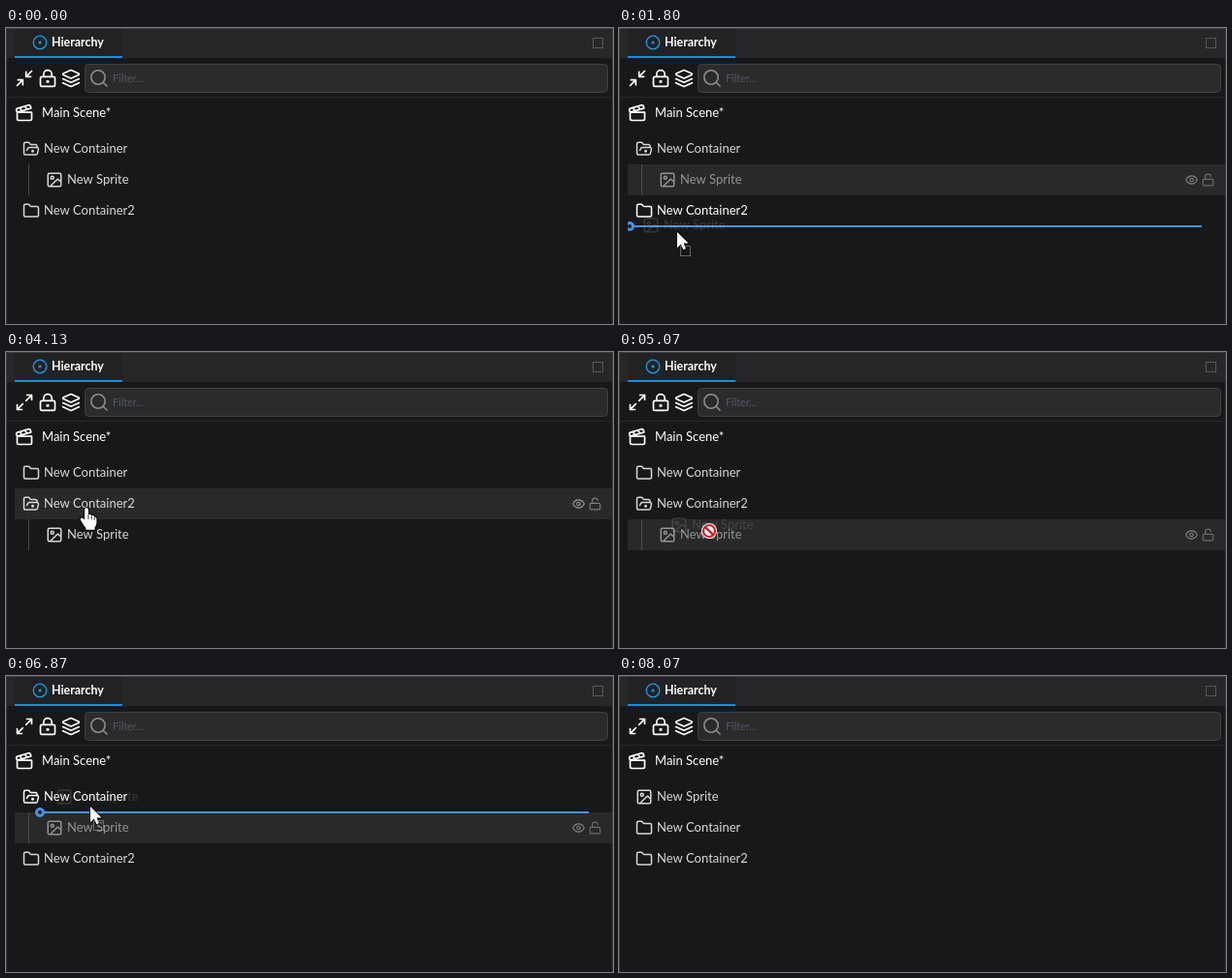
Recreate the animation shown at these times as an HTML page with a canvas. Size 626 by 306 pixels, loop 8670 ms.

```html
<!DOCTYPE html>
<html lang="en">
<head>
<meta charset="utf-8">
<title>Hierarchy panel</title>
<style>
  html, body { margin: 0; width: 100%; height: 100%; overflow: hidden; background: #18181a; }
  canvas { display: block; width: 626px; height: 306px; }
</style>
</head>
<body>
<canvas id="stage"></canvas>
<script>
const W = 626, H = 306, LOOP = 8670, TICK = 1000 / 15;
const LEFT = 9, RIGHT = 625, TOP = 109, ROW = 32, INDENT = 24;
const TEXT = '#d8d8d8', BLUE = '#4b91e2';

const canvas = document.getElementById('stage');
const ctx = canvas.getContext('2d');
const dpr = window.devicePixelRatio || 1;
canvas.width = W * dpr;
canvas.height = H * dpr;

// Icons live on a 24-unit grid.
const box = (x, y, w, h, r) =>
  `M${x + r} ${y}h${w - 2 * r}a${r} ${r} 0 0 1 ${r} ${r}v${h - 2 * r}a${r} ${r} 0 0 1 ${-r} ${r}h${2 * r - w}a${r} ${r} 0 0 1 ${-r} ${-r}v${2 * r - h}a${r} ${r} 0 0 1 ${r} ${-r}z`;
const ring = (x, y, r) => `M${x - r} ${y}a${r} ${r} 0 1 0 ${2 * r} 0a${r} ${r} 0 1 0 ${-2 * r} 0z`;
const layer = y => `M22 ${y}l-9.2 4.2a2 2 0 0 1-1.6 0L2 ${y}`;

const icons = {
  shrink: 'M4 14h6v6M20 10h-6V4M14 10l7-7M3 21l7-7',
  grow: 'M15 3h6v6M9 21H3v-6M21 3l-7 7M3 21l7-7',
  lock: box(3, 10, 18, 12, 2) + 'M7 10V7a5 5 0 0 1 10 0v3' + ring(12, 16, 1),
  unlock: box(3, 11, 18, 11, 2) + 'M7 11V7a5 5 0 0 1 9.9-1',
  layers: 'M12.8 2.2a2 2 0 0 0-1.6 0L2.6 6.1a1 1 0 0 0 0 1.8l8.6 3.9a2 2 0 0 0 1.6 0l8.6-3.9a1 1 0 0 0 0-1.8z' + layer(12.6) + layer(17.6),
  clapper: 'M20.2 6L3 11l-.9-2.4c-.3-1.1.3-2.2 1.3-2.5l13.5-4c1.1-.3 2.2.3 2.5 1.3zM6.2 5.3l3.1 3.9M12.4 3.4l3.1 4M3 11h18v8a2 2 0 0 1-2 2H5a2 2 0 0 1-2-2z',
  folder: 'M20 20a2 2 0 0 0 2-2V8a2 2 0 0 0-2-2h-7.9a2 2 0 0 1-1.7-.9L9.6 3.9A2 2 0 0 0 7.9 3H4a2 2 0 0 0-2 2v13a2 2 0 0 0 2 2z',
  open: 'M6 14l1.5-2.9A2 2 0 0 1 9.2 10H20a2 2 0 0 1 1.9 2.5l-1.5 6a2 2 0 0 1-2 1.5H4a2 2 0 0 1-2-2V5a2 2 0 0 1 2-2h3.9a2 2 0 0 1 1.7.9l.8 1.2a2 2 0 0 0 1.7.9H18a2 2 0 0 1 2 2v2' + ring(14, 15, 1),
  image: box(3, 3, 18, 18, 2) + ring(9, 9, 2) + 'M21 15l-3.1-3.1a2 2 0 0 0-2.8 0L6 21',
  eye: 'M2 12Q5.5 5 12 5T22 12Q18.500 19 12 19T2 12z' + ring(12, 12, 3)
};
for (const name in icons) icons[name] = new Path2D(icons[name]);

const arrow = new Path2D('M0 0V16.200L3.800 12.600L6.400 18.200L9 17L6.500 11.600H11.600z');
const hand = new Path2D('M-1.900 10V1.200Q-1.900 -1 0 -1T1.900 1.200V6.200Q4.800 5.400 5.200 7.200Q7.600 6.600 8.200 8.400Q10.400 8.200 10.400 10.600V14.500Q10.400 17.500 8.600 19.200V21.800H-.6V19.800Q-2.600 18 -4.200 15L-6.200 11.600Q-6.800 9.800 -5.200 9.400Q-3.800 9.200 -1.900 11.600z');
const fingers = new Path2D('M1.900 6.500V11M5.200 7.400V11.200M8.200 8.600V11.600');

const C1 = 'New Container', C2 = 'New Container2', SPRITE = 'New Sprite';
const row = (name, icon, level = 0) => ({ name, icon, level });
const scenes = [
  { end: 31, rows: [row(C1, 'open'), row(SPRITE, 'image', 1), row(C2, 'folder')] },
  { end: 58, rows: [row(C1, 'folder'), row(C2, 'folder'), row(SPRITE, 'image')] },
  { end: 91, rows: [row(C1, 'folder'), row(C2, 'open'), row(SPRITE, 'image', 1)] },
  { end: 112, rows: [row(C1, 'open'), row(SPRITE, 'image', 1), row(C2, 'folder')] },
  { end: 130, rows: [row(SPRITE, 'image'), row(C1, 'folder'), row(C2, 'folder')] }
];

// Drags as ticks, with the offset from pointer to the ghost's icon.
const drags = [
  { from: 16, to: 31, dx: -27, dy: -7 },
  { from: 43, to: 58, dx: -25, dy: -7 },
  { from: 76, to: 91, dx: -31, dy: -6 },
  { from: 100, to: 112, dx: -27, dy: -10 }
];

// Pointer path: tick, x, y.
const path = [
  [1, 606, 296], [5, 400, 200], [9, 140, 128], [11, 70, 155], [13, 77, 164],
  [15, 77, 164], [16, 77, 160], [18, 74, 146], [27, 60, 211], [34, 60, 211],
  [41, 51, 196], [42, 51, 196], [43, 56, 190], [46, 78, 173], [52, 84, 153],
  [58, 84, 153], [71, 81, 195], [75, 81, 195], [76, 93, 185], [86, 86, 130],
  [93, 86, 130], [98, 77, 167], [99, 77, 167], [100, 78, 160], [103, 87, 135],
  [107, 88, 111], [112, 88, 111], [121, 110, 312]
];

const same = (a, b) => a[1] === b[1] && a[2] === b[2];

function slope(i, axis) {
  const a = path[Math.max(i - 1, 0)], p = path[i], b = path[Math.min(i + 1, path.length - 1)];
  if ((a !== p && same(a, p)) || (b !== p && same(b, p))) return 0;
  const before = p[axis] - a[axis], after = b[axis] - p[axis];
  if (a !== p && b !== p && before * after <= 0) return 0;
  return (b[axis] - a[axis]) / (b[0] - a[0]);
}

function pointerAt(k) {
  if (k < path[0][0] || k >= path[path.length - 1][0]) return null;
  const i = path.findIndex((p, n) => n + 1 < path.length && k < path[n + 1][0]);
  const a = path[i], b = path[i + 1], span = b[0] - a[0];
  const u = (k - a[0]) / span, v = 1 - u;
  const ease = axis =>
    v * v * (1 + 2 * u) * a[axis] + u * u * (3 - 2 * u) * b[axis] +
    span * u * v * (v * slope(i, axis) - u * slope(i + 1, axis));
  return { x: Math.round(ease(1)), y: Math.round(ease(2)) };
}

function icon(name, cx, cy, size, color) {
  ctx.save();
  ctx.translate(cx - size / 2, cy - size / 2);
  ctx.scale(size / 24, size / 24);
  ctx.strokeStyle = color;
  ctx.lineWidth = 2;
  ctx.lineCap = ctx.lineJoin = 'round';
  ctx.stroke(icons[name]);
  ctx.restore();
}

function label(str, x, y, color, size = 13, weight = 400) {
  ctx.font = `${weight} ${size}px Lato, sans-serif`;
  ctx.fillStyle = color;
  ctx.fillText(str, x, y);
}

function rect(x, y, w, h, color) {
  ctx.fillStyle = color;
  ctx.fillRect(x, y, w, h);
}

function circle(x, y, r, color, width) {
  ctx.beginPath();
  ctx.arc(x, y, r, 0, Math.PI * 2);
  ctx.lineWidth = width || 1;
  ctx.strokeStyle = ctx.fillStyle = color;
  width ? ctx.stroke() : ctx.fill();
}

function line(x1, y1, x2, y2, color, width) {
  ctx.beginPath();
  ctx.moveTo(x1, y1);
  ctx.lineTo(x2, y2);
  ctx.strokeStyle = color;
  ctx.lineWidth = width;
  ctx.stroke();
}

function drawPanel(k) {
  rect(0, 0, W, H, '#18181a');
  rect(0, 0, W, 31, '#27272a');
  rect(LEFT, 1, 111, 30, '#222224');
  rect(0, 0, W, 1, '#3c3c3e');
  rect(0, 0, 1, H, '#3c3c3e');
  rect(W - 1, 0, 1, H, '#38383a');
  rect(LEFT, 29, 111, 2, '#158fe6');
  circle(35, 15, 6.8, '#1c9be8', 1.3);
  circle(35, 15, 1.5, '#1c9be8');
  label('Hierarchy', 47, 19, '#fff', 12.4, 700);
  ctx.strokeStyle = '#5a5a5c';
  ctx.lineWidth = 1;
  ctx.strokeRect(605.5, 10.5, 10, 10);

  icon(k < 58 ? 'shrink' : 'grow', 19, 52, 20, '#fff');
  icon('lock', 43, 52, 20, '#fff');
  icon('layers', 67, 52, 20, '#fff');

  ctx.beginPath();
  ctx.roundRect(81.5, 37.5, 539, 29, 4);
  ctx.fillStyle = '#2b2b2b';
  ctx.fill();
  ctx.strokeStyle = '#424242';
  ctx.stroke();
  circle(95, 51, 7.2, '#8e8e8e', 1.6);
  line(100.2, 56.2, 104.5, 60.5, '#8e8e8e', 1.6);
  label('Filter...', 110, 56, '#505667', 10.8);

  rect(1, 71, W - 2, 1, '#29292b');
  icon('clapper', 19, 88, 20, '#fff');
  label('Main Scene*', 37, 92, '#fff');
}

function drawRow(item, i, active, dragged, bright) {
  const y = TOP + i * ROW, cy = y + ROW / 2, x = 26 + item.level * INDENT;
  if (active) rect(LEFT, y, RIGHT - LEFT, ROW, '#29292b');
  if (item.level) rect(23, y, 1, ROW, '#4c4c4e');
  const color = bright ? '#fff' : TEXT;
  ctx.globalAlpha = dragged ? 0.6 : 1;
  icon(item.icon, x, cy, 18, color);
  label(item.name, x + 13, cy + 4, color);
  if (active) {
    icon('eye', 590.5, cy, 14, dragged ? '#b8b8ba' : '#98989a');
    icon('unlock', 607.5, cy, 14, dragged ? '#98989a' : '#7c7c7e');
  }
  ctx.globalAlpha = 1;
}

function drawDropLine(slot, level) {
  const x = LEFT + level * INDENT + 2, y = TOP + slot * ROW;
  ctx.save();
  ctx.beginPath();
  ctx.rect(LEFT, 72, RIGHT - LEFT, H);
  ctx.clip();
  circle(x, y, 3.5, BLUE, 3);
  rect(x + 4, y - 1, 601 - x - 4, 2, BLUE);
  ctx.restore();
}

function drawGhost(x, y) {
  ctx.globalAlpha = 0.17;
  icon('image', x, y, 18, TEXT);
  label(SPRITE, x + 13, y + 4, TEXT);
  ctx.globalAlpha = 1;
}

function drawPointer(p, kind) {
  ctx.save();
  ctx.translate(p.x, p.y);
  if (kind === 'deny') {
    circle(0, 0, 8, '#fff');
    circle(0, 0, 6, '#cf1f28', 2.2);
    line(-4.2, -4.2, 4.2, 4.2, '#cf1f28', 2.4);
  } else {
    const shape = kind === 'hand' ? hand : arrow;
    ctx.lineJoin = 'round';
    ctx.lineWidth = 1.6;
    ctx.strokeStyle = '#000';
    ctx.stroke(shape);
    ctx.fillStyle = '#fff';
    ctx.fill(shape);
    if (kind === 'hand') {
      ctx.lineWidth = 0.8;
      ctx.stroke(fingers);
    }
    if (kind === 'move') {
      ctx.setLineDash([1, 1]);
      ctx.lineWidth = 1;
      ctx.strokeStyle = '#b4b4b4';
      ctx.strokeRect(3.5, 14.5, 10, 10);
    }
  }
  ctx.restore();
}

function draw(t) {
  const k = Math.floor((t + 5) / TICK);
  const { rows } = scenes.find(s => k < s.end) || scenes[scenes.length - 1];
  const drag = drags.find(d => k >= d.from && k < d.to);
  const p = pointerAt(k);
  const over = p ? Math.floor((p.y - TOP) / ROW) : -1;
  const held = drag ? rows.findIndex(r => r.name === SPRITE) : -1;

  let slot = -1, target = -1;
  if (drag) {
    const near = Math.min(3, Math.max(0, Math.round((p.y - TOP) / ROW)));
    if (Math.abs(p.y - TOP - near * ROW) < 8) slot = near;
    target = slot >= 0 ? slot - 1 : over;
  }

  ctx.setTransform(dpr, 0, 0, dpr, 0, 0);
  drawPanel(k);
  rows.forEach((r, i) =>
    drawRow(r, i, drag ? i === held : i === over, i === held, i === target && i !== held));
  if (slot >= 0) drawDropLine(slot, rows[slot] ? rows[slot].level : 0);
  if (drag) drawGhost(p.x + drag.dx, p.y + drag.dy);
  if (!p) return;
  const denied = slot < 0 && over === held;
  const kind = drag ? (denied ? 'deny' : 'move') : over >= 0 && over < 3 ? 'hand' : 'arrow';
  drawPointer(p, kind);
}

const start = performance.now();
function loop() {
  draw((performance.now() - start) % LOOP);
  requestAnimationFrame(loop);
}
loop();
</script>
</body>
</html>
```
